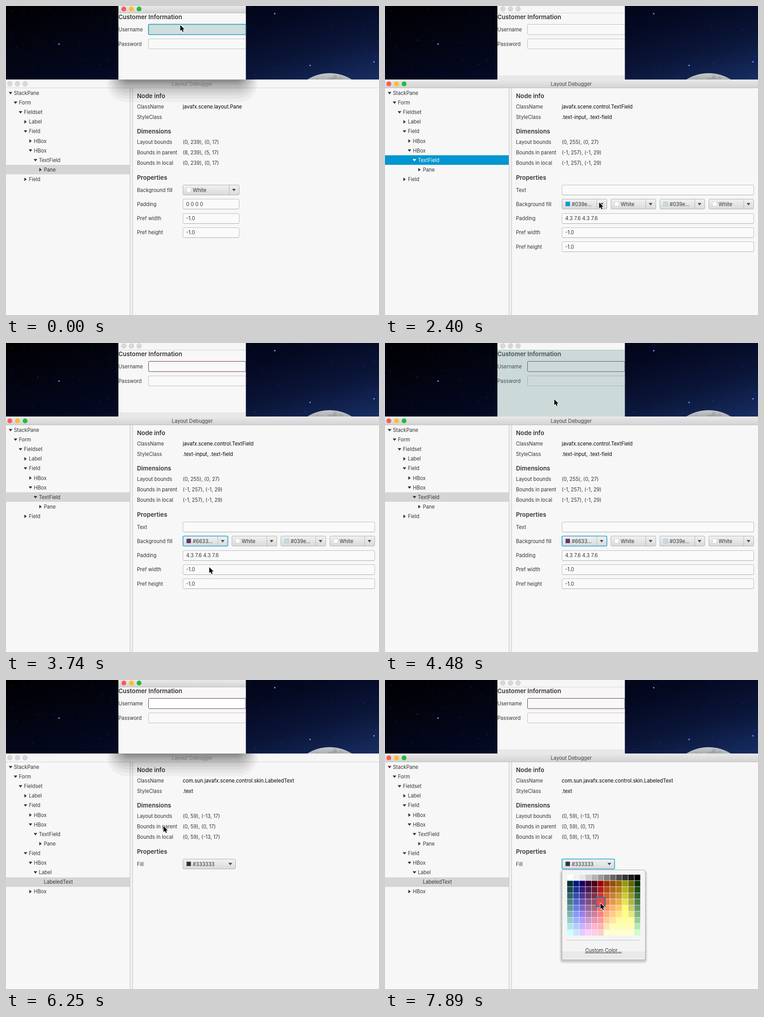
An HTML page with a canvas for the animation above (8000 ms loop, 823 by 681 pixels).

```html
<!DOCTYPE html>
<html>
<head>
<meta charset="utf-8">
<title>Layout Debugger</title>
<style>
html, body { margin: 0; width: 100%; height: 100%; overflow: hidden; background: #f7f7f7; }
canvas { display: block; }
</style>
</head>
<body>
<canvas id="stage" width="823" height="681"></canvas>
<script>
const W = 823, H = 681, LOOP = 8000, STEP = 146;
const ctx = document.getElementById('stage').getContext('2d');
const INK = '#333', PURPLE = '#663366', PANEL = '#f7f7f7', FOCUS = '#1ba5d6';
const TINT = 'rgba(100,147,143,0.3)';
const FONT = 'Inter, Roboto, sans-serif';

// Moments at which the interface switches state
const SELECT_FIELD = 150, DEBUGGER_ON = 2110, PALETTE_OPEN = 2550, PICK = 3590;
const SELECT_LABEL = 5360, DEBUGGER_AGAIN = 7000, PALETTE_AGAIN = 7150;

// Pointer strokes: each runs in even steps along a quadratic curve bent by `via`
const MOVES = [
  { at: 930, steps: 8, to: [472, 433], via: [374, 213] },
  { at: 2850, steps: 4, to: [450, 504], via: [444, 505] },
  { at: 3740, steps: 1, to: [448, 494] },
  { at: 4040, steps: 8, to: [276, 83], via: [384, -40] },
  { at: 5950, steps: 4, to: [436, 392], via: [226, 257] },
  { at: 6700, steps: 8, to: [460, 463], via: [530, 400] },
  { at: 7890, steps: 1, to: [475, 492] }
];

function pointerAt(t) {
  let pos = [384, 42];
  for (const { at, steps, to, via = to } of MOVES) {
    if (t < at) break;
    const u = Math.min(steps, Math.floor((t - at) / STEP) + 1) / steps, v = 1 - u;
    pos = pos.map((p, i) => v * v * p + 2 * u * v * via[i] + u * u * to[i]);
  }
  return pos;
}

const within = (t, a, b) => t >= a && t < b;
const blink = (t, from, to) => within(t, from, to) && (t - from) % 930 < 480;

function random(seed) {
  return () => (seed = seed * 16807 % 2147483647) / 2147483647;
}

function rect(x, y, w, h, color) {
  ctx.fillStyle = color;
  ctx.fillRect(x, y, w, h);
}

function box(x, y, w, h, r, fill, stroke, line = 1) {
  ctx.beginPath();
  ctx.roundRect(x, y, w, h, r);
  if (fill) { ctx.fillStyle = fill; ctx.fill(); }
  if (stroke) { ctx.strokeStyle = stroke; ctx.lineWidth = line; ctx.stroke(); }
}

function disc(x, y, r, fill, stroke) {
  box(x - r, y - r, 2 * r, 2 * r, r, fill, stroke);
}

// Small triangle pointing down or right
function arrow(x, y, down, color) {
  ctx.save();
  ctx.translate(x, y);
  if (!down) ctx.rotate(-Math.PI / 2);
  ctx.beginPath();
  ctx.moveTo(-4, -2.5);
  ctx.lineTo(4, -2.5);
  ctx.lineTo(0, 2.7);
  ctx.fillStyle = color;
  ctx.fill();
  ctx.restore();
}

function clipped(x, y, w, h, paint) {
  ctx.save();
  ctx.beginPath();
  ctx.rect(x, y, w, h);
  ctx.clip();
  paint();
  ctx.restore();
}

function gradient(x, y, colors, x0 = 0, y0 = 0) {
  const g = ctx.createLinearGradient(x0, y0, x, y);
  colors.forEach((c, i) => g.addColorStop(i / (colors.length - 1), c));
  return g;
}
const vertical = (top, bottom, ...colors) => gradient(0, bottom, colors, 0, top);

function text(str, x, midY, color = INK, align = 'left') {
  ctx.font = '11.1px ' + FONT;
  ctx.textAlign = align;
  ctx.fillStyle = color;
  ctx.fillText(str, x, midY + 4);
}

function heading(str, x, midY) {
  ctx.font = '600 13.3px ' + FONT;
  ctx.textAlign = 'left';
  ctx.fillStyle = INK;
  ctx.fillText(str, x, midY + 4.7);
}

function lights(x, y, active) {
  ['#fb5b55', '#fbbc2f', '#20bd3c'].forEach((c, i) =>
    disc(x + i * 16.8, y, 5.3, active ? c : '#d8d8d8', active ? null : '#cdcdcd'));
}

function titleBar(x, y, w, h, active) {
  rect(x, y, w, h, active ? vertical(y, y + h, '#e9e9e9', '#d2d2d2') : '#f6f6f6');
  rect(x, y + h - 1, w, 1, active ? '#bcbcbc' : '#d3d3d3');
}

function wallpaper() {
  const rnd = random(11);
  rect(0, 0, W, 162, gradient(108, 370, ['#000002', '#020410', '#040820', '#0a1538', '#172d62']));
  for (let i = 0; i < 190; i++)
    rect(rnd() * W, rnd() * 160, 1, 1, `rgba(190,200,230,${0.1 + 0.7 * rnd() ** 3})`);
  [[117, 84], [593, 17], [671, 131], [812, 123]].forEach(([x, y]) => {
    disc(x, y, 1.9, '#2456d8');
    disc(x, y, 0.9, '#c4d8ff');
  });
  clipped(529, 0, W, 162, () => {
    disc(714, 241, 93, vertical(148, 164, '#c6c9ca', '#a9adb0'));
    for (let i = 0; i < 7; i++)
      disc(685 + 60 * rnd(), 155 + 8 * rnd(), 2 + 5 * rnd(), 'rgba(120,125,130,0.2)');
  });
}

function customerForm(t, active) {
  rect(248, 0, 281.5, 162, PANEL);
  titleBar(248, 0, 281, 16, active);
  lights(260, 6.5, active);
  heading('Customer Information', 248, 24);
  text('Username', 248, 52);
  text('Password', 248, 83.5);

  const focused = t < DEBUGGER_ON;
  const border = t >= PICK ? PURPLE : focused ? FOCUS : '#b9b9b9';
  if (focused) box(313.5, 39.5, 216, 24, 3, null, '#9fd8ee');
  box(314.5, 40.5, 214.5, 22.5, 2, active ? '#fff' : '#f9f9f9', border, focused ? 1.6 : 1);
  box(314.5, 72.5, 214.5, 22, 2, '#f9f9f9', '#bebebe');
  if (blink(t, SELECT_FIELD, DEBUGGER_ON) || blink(t, 5500, DEBUGGER_AGAIN))
    rect(321, 45, 1, 14, '#555');

  // Inspector highlight under the pointer
  const wholeForm = within(t, 4480, 4920);
  if (t < 1080) rect(314, 40, 215, 23.5, TINT);
  else if (t < 1380) rect(314, 72, 215, 23, TINT);
  else if (wholeForm) rect(248, 15, 281, 147, TINT);
  else if (within(t, 4920, 5950)) rect(248, 76, 51, 15, TINT);
  if (!active && !wholeForm) rect(248, 153, 281, 9, '#e8e8e8');
}

function formShadow() {
  for (let i = 0; i < 9; i++) {
    const left = 223 + i * 3.8, bottom = 212 - 8 * i + 0.3 * i * i;
    box(left, 80, 778 - 2 * left, bottom - 80, 42 - 3 * i, `rgba(0,0,0,${0.035 + 0.006 * i})`);
  }
}

// Indentation is depth; v = open, > = closed, - = leaf
const TREE_TOP = `v StackPane
 v Form
  v Fieldset
   > Label
   v Field
    > HBox
    v HBox
     v TextField
      > Pane`;
const FIELD_CLOSED = `
   > Field`;
const FIELD_OPEN = `
   v Field
    v HBox
     v Label
      - LabeledText
    > HBox`;

function tree(t, focused) {
  const rows = (TREE_TOP + (t < SELECT_LABEL ? FIELD_CLOSED : FIELD_OPEN)).split('\n');
  const selected = t < SELECT_FIELD ? 'Pane' : t < SELECT_LABEL ? 'TextField' : 'LabeledText';
  rows.forEach((row, i) => {
    const depth = row.search(/\S/), [mark, name] = row.trim().split(' ');
    const y = 192 + 21.1 * i, x = 10 + 11 * depth, on = name === selected;
    if (on) rect(0, Math.round(y - 10.5), 273, 21, focused ? '#0096d1' : '#d5d5d5');
    const ink = on && focused ? '#fff' : INK;
    if (mark !== '-') arrow(x, y, mark === 'v', ink);
    text(name, x + 7.5, y, ink);
  });
}

const controlTop = midY => Math.round(midY - 11.5) + 0.5;

function input(value, midY, w) {
  const top = controlTop(midY);
  box(390.5, top, w, 22, 2.5, '#fafafa', '#bcbcbc');
  rect(392, top + 21.5, w - 3, 1, '#a9a9a9');
  text(value, 397.5, midY);
}

function combo(x, midY, w, swatch, label, divider, focused) {
  const top = controlTop(midY);
  box(x + 0.5, top, w, 22, 2.5, vertical(top, top + 22, '#f1f1f1', '#dadada'),
    focused ? FOCUS : '#b2b2b2', focused ? 1.6 : 1);
  if (divider) rect(x + w - 22, top + 0.5, 1, 21, '#b9b9b9');
  box(x + 8.5, top + 6, 9.5, 9.5, 0, swatch, swatch === '#fff' ? '#d2d2d2' : 'rgba(0,0,0,0.12)');
  text(label, x + 22, midY);
  arrow(x + w - 11, midY, true, '#444');
}

const PANE_INFO = {
  className: 'javafx.scene.layout.Pane', style: '',
  bounds: ['(0, 239), (0, 17)', '(8, 239), (5, 17)', '(0, 239), (0, 17)']
};
const FIELD_INFO = {
  className: 'javafx.scene.control.TextField', style: '.text-input, .text-field',
  bounds: ['(0, 255), (0, 27)', '(-1, 257), (-1, 29)', '(-1, 257), (-1, 29)']
};
const LABEL_INFO = {
  className: 'com.sun.javafx.scene.control.skin.LabeledText', style: '.text',
  bounds: ['(0, 59), (-13, 17)', '(0, 59), (0, 17)', '(0, 59), (-13, 17)']
};

function pair(name, value, midY, color) {
  text(name, 289, midY);
  text(value, 390, midY, color);
}

function details(t) {
  const info = t < SELECT_FIELD ? PANE_INFO : t < SELECT_LABEL ? FIELD_INFO : LABEL_INFO;
  heading('Node info', 289, 198);
  pair('ClassName', info.className, 221.5, '#000');
  pair('StyleClass', info.style, 244.5, '#000');
  heading('Dimensions', 289, 276.5);
  ['Layout bounds', 'Bounds in parent', 'Bounds in local'].forEach((name, i) =>
    pair(name, info.bounds[i], 300 + 22.8 * i));
  heading('Properties', 289, 378);

  let y = 405.5;
  const row = (name, control) => { text(name, 289, y); control(y); y += 31.25; };
  const sizes = (padding, w) => {
    row('Padding', y => input(padding, y, w));
    row('Pref width', y => input('-1.0', y, w));
    row('Pref height', y => input('-1.0', y, w));
  };
  if (info === PANE_INFO) {
    row('Background fill', y => combo(390, y, 124, '#fff', 'White', true));
    sizes('0 0 0 0', 124);
  } else if (info === FIELD_INFO) {
    const first = t >= PICK ? [PURPLE, '#6633...'] : ['#039ed3', '#039e...'];
    const fills = [first, ['#fff', 'White'], ['#c5dbe6', '#039e...'], ['#fff', 'White']];
    row('Text', y => input('', y, 423));
    row('Background fill', y => fills.forEach(([color, name], i) =>
      combo(390 + 108 * i, y, 99, color, name, true, i === 0 && t >= PALETTE_OPEN)));
    sizes('4.3 7.6 4.3 7.6', 423);
  } else {
    row('Fill', y => combo(390, y, 116, '#333', '#333333', false, t >= PALETTE_AGAIN));
  }
}

const HUES = '033 01a80 1a0068 303 4d001a 900 930 994d00 960 990 660 030'
  .replace('01a80', '001a80').split(' ')
  .map(h => (h.length === 3 ? h.replace(/./g, '$&$&') : h).match(/../g).map(c => parseInt(c, 16)));

// Grays on top; below, each row adds a tenth of full brightness
function cellColor(col, row) {
  const gray = 255 - (col < 3 ? 12.75 * col : 25.5 * (col - 1));
  const rgb = row ? HUES[col].map(c => c + 25.5 * (row - 1)) : [gray, gray, gray];
  return `rgb(${rgb.map(c => Math.round(Math.max(0, Math.min(255, c))))})`;
}

function palette(top, px, py) {
  const gx = 402, gy = top + 11, cell = 13.5;
  for (let i = 0; i < 5; i++)
    box(385 + i, top + i, 194 - 2 * i, 207 - 2.4 * i, 8 - i, 'rgba(0,0,0,0.045)');
  box(390.5, top + 0.5, 184, 198, 4, '#f4f4f4', '#aeaeae');
  rect(391, top + 180, 183, 16, '#e9e9e9');
  for (let row = 0; row < 10; row++)
    for (let col = 0; col < 12; col++)
      rect(gx + col * cell, gy + row * cell, cell - 0.8, cell - 0.8, cellColor(col, row));

  const col = Math.floor((px - gx) / cell), row = Math.floor((py - gy) / cell);
  if (within(col, 0, 12) && within(row, 0, 10))
    box(gx + (col + 0.5) * cell - 10.5, gy + (row + 0.5) * cell - 10.5, 20, 20, 0,
      cellColor(col, row), '#1583ad', 2);
  rect(401, top + 155, 163, 1, '#c2c2c2');
  text('Custom Color...', 482, top + 177.5, INK, 'center');
  rect(441.5, top + 183, 80.5, 1, INK);
}

const ARROW = new Path2D('M.5 0v13l3-2.7 2.2 4.7 2.1-.9-2-4.5 4.1-.2z');

function pointer(x, y) {
  ctx.save();
  ctx.translate(Math.round(x), Math.round(y));
  ctx.lineJoin = 'round';
  ctx.strokeStyle = '#fff';
  ctx.lineWidth = 2;
  ctx.stroke(ARROW);
  ctx.fillStyle = '#000';
  ctx.fill(ARROW);
  ctx.restore();
}

function draw(t) {
  const debuggerOn = within(t, DEBUGGER_ON, SELECT_LABEL) || t >= DEBUGGER_AGAIN;
  const treeFocus = within(t, DEBUGGER_ON, PALETTE_OPEN) || within(t, DEBUGGER_AGAIN, PALETTE_AGAIN);
  const [px, py] = pointerAt(t);

  wallpaper();
  clipped(248, 0, 281.5, 162, () => customerForm(t, !debuggerOn));

  rect(0, 162, W, H - 162, PANEL);
  titleBar(0, 162, W, 19, debuggerOn);
  lights(8.5, 171.5, debuggerOn);
  text('Layout Debugger', 411, 171.5, debuggerOn ? '#444' : '#a8a8a8', 'center');
  rect(273, 181, 7, 500, '#efefef');
  rect(273, 181, 1, 500, '#c6c6c6');
  rect(279, 181, 1, 500, '#c6c6c6');
  if (!debuggerOn) clipped(0, 162, W, H, formShadow);
  tree(t, treeFocus);
  details(t);

  if (within(t, PALETTE_OPEN, PICK)) palette(449, px, py);
  if (t >= PALETTE_AGAIN) palette(418, px, py);
  pointer(px, py);
}

let start;
function tick(now) {
  start ??= now;
  draw((now - start) % LOOP);
  requestAnimationFrame(tick);
}
draw(0);
requestAnimationFrame(tick);
</script>
</body>
</html>
```
